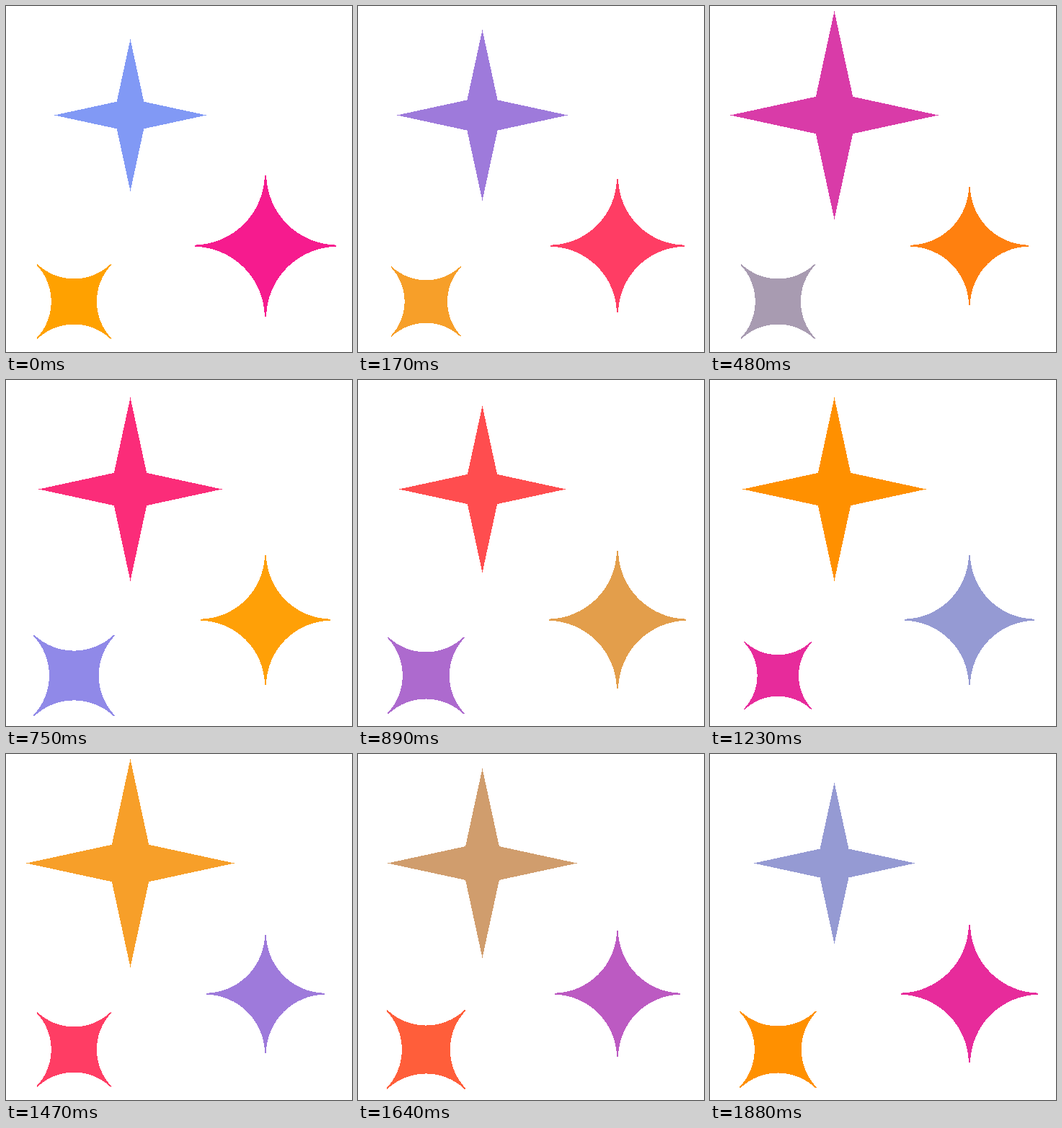
An HTML page for the animation above (1980 ms loop, 480x480 px).

```html
<!DOCTYPE html>
<html lang="en">
<head>
<meta charset="utf-8">
<title>Sparkles</title>
<style>
  html, body { margin: 0; width: 100%; height: 100%; overflow: hidden; background: #fff; }
  svg { display: block; width: 100vw; height: 100vh; }
</style>
</head>
<body>
<svg viewBox="0 0 480 480" shape-rendering="crispEdges"></svg>
<script>
const LOOP = 1980;
const STEPS = 24;

// Steps last 70 ms, two in five last 100 ms
const stepTime = k => 70 * k + 30 * Math.round(0.4 * k);

// Blue, pink and orange; values beyond 0..255 are clamped when painted
const colours = [[129, 153, 245], [246, 27, 142], [286, 161, -27]];

// Unit shapes with their tips at distance 1
function spike(n) {
  return `M0-1L${n}-${n}L1 0L${n} ${n}L0 1L-${n} ${n}L-1 0L-${n}-${n}Z`;
}
function hollow(tip, bend) {
  const arc = (x, y) => `A${bend} ${bend} 0 0 0 ${x} ${y}`;
  return `M${tip} -1${arc(1, -tip)}L1 ${tip}${arc(tip, 1)}L${-tip} 1` +
    `${arc(-1, tip)}L-1 ${-tip}${arc(-tip, -1)}Z`;
}

// sizes: radii at evenly spaced moments; delay and hue are in steps
const curved = hollow(0.011, 1.01);
const stars = [
  { x: 172.5, y: 151.5, turn: 0, hue: 0, delay: 0, sizes: [105.5, 144.3, 110, 144.3], path: spike(0.178) },
  { x: 360, y: 332.7, turn: 0, hue: 8, delay: 0, sizes: [98, 82, 98, 82], path: curved },
  { x: 94.3, y: 410, turn: 45, hue: 16, delay: 3, sizes: [66.2, 79.3, 66.2, 79.3], path: curved }
];

// Straight blend through evenly spaced stops, once around per loop
function blend(stops, step) {
  const pos = ((step + STEPS) % STEPS) / STEPS * stops.length;
  const i = Math.floor(pos);
  const a = [stops[i]].flat();
  const b = [stops[(i + 1) % stops.length]].flat();
  return a.map((v, j) => v + (b[j] - v) * (pos - i));
}

const svg = document.querySelector("svg");
for (const star of stars) {
  star.node = document.createElementNS("http://www.w3.org/2000/svg", "path");
  star.node.setAttribute("d", star.path);
  svg.append(star.node);
}

function draw(step) {
  for (const { node, x, y, turn, hue, delay, sizes } of stars) {
    const [r] = blend(sizes, step - delay);
    const rgb = blend(colours, step + hue).map(Math.round);
    node.setAttribute("transform", `translate(${x} ${y}) rotate(${turn}) scale(${r})`);
    node.setAttribute("fill", `rgb(${rgb})`);
  }
}

const start = performance.now();
function tick() {
  const t = (performance.now() - start) % LOOP;
  let step = 0;
  while (stepTime(step + 1) <= t) step++;
  draw(step);
  requestAnimationFrame(tick);
}
tick();
</script>
</body>
</html>
```
